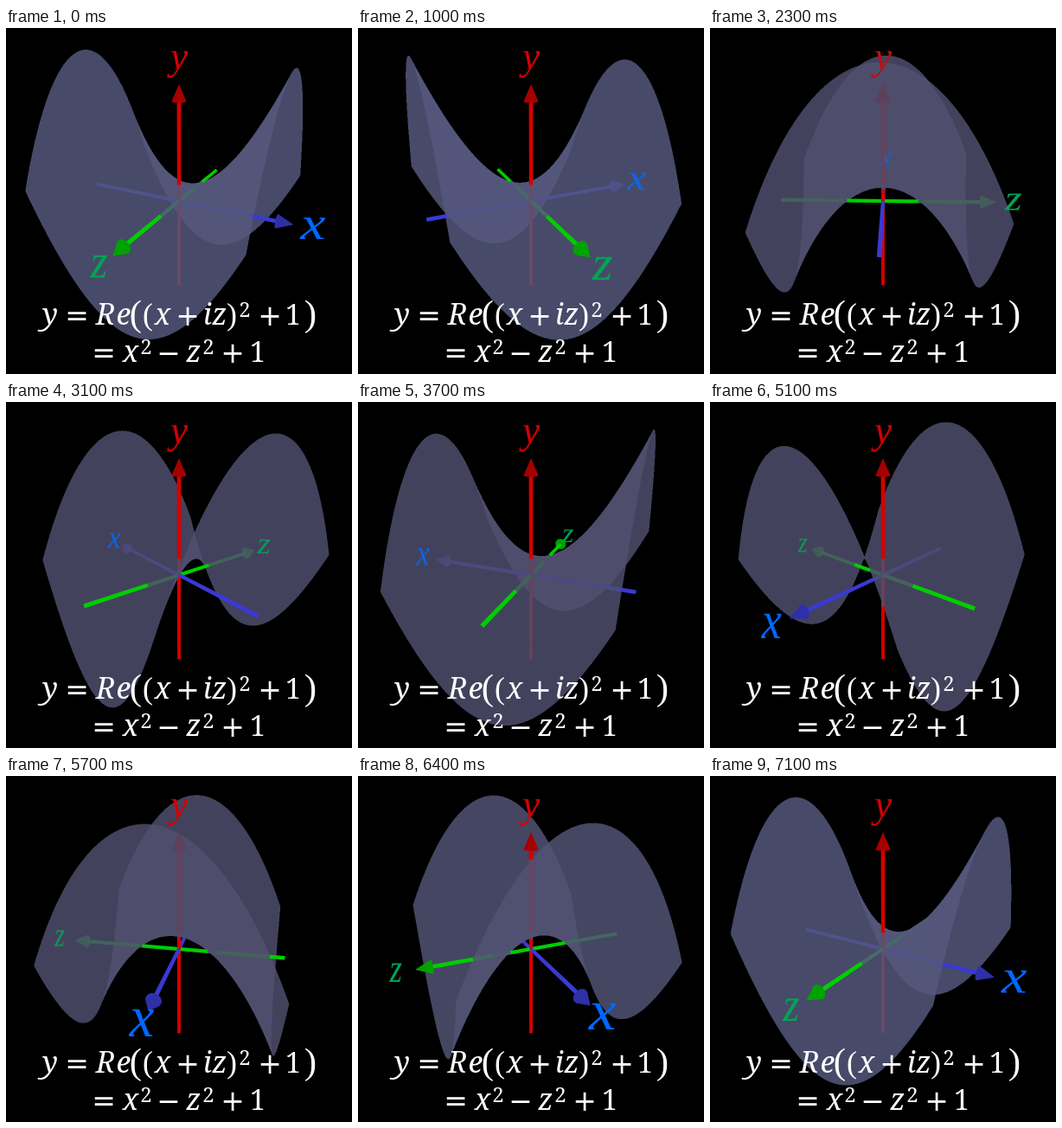
Recreate the animation shown at these times as an HTML page with a canvas. Size 400 by 400 pixels, loop 7.2 s.

```html
<!DOCTYPE html>
<html lang="en">
<head>
<meta charset="utf-8">
<title>Rotating saddle surface</title>
<style>
  html, body { margin: 0; width: 100%; height: 100%; overflow: hidden; background: #000; }
  canvas, svg { position: absolute; left: 0; top: 0; width: 400px; height: 400px; }
  text { font: italic 34px "Noto Serif", "Liberation Serif", serif; fill: #fff; text-anchor: middle; }
  .n { font-size: 32px; font-style: normal; }
  .op { font: 33px "DejaVu Sans", sans-serif; }
  .sup { font-size: 24px; font-style: normal; }
  .paren { font: 36px "Liberation Serif", serif; }
  .big { font: 43px "Liberation Serif", serif; }
</style>
</head>
<body>
<canvas id="view" width="800" height="800"></canvas>
<svg id="formula" viewBox="0 0 400 400"></svg>
<script>
const LOOP = 7200, STEP = 100, SS = 2, SIZE = 400 * SS;
const FOCAL = 442, RAD = Math.PI / 180;
const SIN = Math.sin(24.4 * RAD), COS = Math.cos(24.4 * RAD);
const TIP = 0.293, TAIL = 0.268, HEAD = 0.037, HEAD_R = 0.0165, LABEL = 0.338;
const ALPHA = 0.84;

// Saddle: y = Y0 + K (x^2 - z^2) + TX x + TZ z over a rectangle
const Y0 = 0.046, K = 4.5, TX = -0.02, TZ = 0.02;
const X_MIN = -0.263, X_MAX = 0.258, Z_MIN = -0.262, Z_MAX = 0.255;

const AXES = [
  { name: "x", dir: [1, 0, 0], line: [58, 58, 212], head: [48, 48, 168], text: [0, 104, 255], size: 47 },
  { name: "y", dir: [0, 1, 0], line: [214, 0, 0], head: [166, 0, 0], text: [214, 0, 0], size: 39 },
  { name: "z", dir: [0, 0, 1], line: [0, 206, 0], head: [0, 162, 0], text: [0, 164, 84], size: 41 }
];

const ctx = document.getElementById("view").getContext("2d");
const image = ctx.createImageData(SIZE, SIZE);
const pixels = new Uint32Array(image.data.buffer);
let ca = 1, sa = 0, eyeX, eyeZ;

const scale = (v, k) => v.map(n => n * k);
const add = (a, b) => a.map((n, i) => n + b[i]);
const css = c => `rgb(${c.map(Math.round).join()})`;

function project([x, y, z]) {
  const right = x * ca + z * sa, away = x * sa - z * ca;
  const d = 1 + away * COS - y * SIN;
  return { h: right / d, v: (y * COS + away * SIN) / d, d, right };
}
const screen = p => [200 + FOCAL * p.h, 200 - FOCAL * p.v];

function inside(t, dx, dz) {
  if (!(t > 0)) return false;
  const x = eyeX + t * dx, z = eyeZ + t * dz;
  return x >= X_MIN && x <= X_MAX && z >= Z_MIN && z <= Z_MAX;
}

// Number of surface layers met by a view ray before the given depth
function layers(h, v, depth) {
  const dy = v * COS - SIN, away = COS + v * SIN;
  const dx = h * ca + away * sa, dz = h * sa - away * ca;
  const a = K * (dx * dx - dz * dz);
  const b = 2 * K * (eyeX * dx - eyeZ * dz) + TX * dx + TZ * dz - dy;
  const c = Y0 + K * (eyeX * eyeX - eyeZ * eyeZ) + TX * eyeX + TZ * eyeZ - SIN;
  const disc = b * b - 4 * a * c;
  if (disc < 0) return 0;
  const q = -0.5 * (b + (b < 0 ? -1 : 1) * Math.sqrt(disc));
  const t1 = q / a, t2 = c / q;
  return (t1 < depth && inside(t1, dx, dz) ? 1 : 0) + (t2 < depth && inside(t2, dx, dz) ? 1 : 0);
}

function veil(color, n, surface, alpha = ALPHA) {
  for (let i = 0; i < n; i++) color = add(scale(color, 1 - alpha), scale(surface, alpha));
  return color;
}

function drawSurface(surface) {
  const shades = [0, 1, 2].map(n => {
    const [r, g, b] = veil([0, 0, 0], n, surface).map(Math.round);
    return (255 << 24 | b << 16 | g << 8 | r) >>> 0;
  });
  for (let j = 0, i = 0; j < SIZE; j++) {
    const v = (200 - (j + 0.5) / SS) / FOCAL;
    for (let k = 0; k < SIZE; k++) {
      pixels[i++] = shades[layers(((k + 0.5) / SS - 200) / FOCAL, v, 9)];
    }
  }
  ctx.putImageData(image, 0, 0);
}

function polygon(points, color) {
  ctx.beginPath();
  points.forEach(p => ctx.lineTo(...p));
  ctx.closePath();
  ctx.fillStyle = ctx.strokeStyle = color;
  ctx.lineWidth = 0.4;
  ctx.fill();
  ctx.stroke();
}

function rod(from, to, color) {
  const p = project(from), q = project(to);
  const [x1, y1] = screen(p), [x2, y2] = screen(q);
  const ex = (x2 - x1) * 0.15, ey = (y2 - y1) * 0.15;
  ctx.beginPath();
  ctx.moveTo(x1 - ex, y1 - ey);
  ctx.lineTo(x2 + ex, y2 + ey);
  ctx.lineWidth = 4.2 / p.d;
  ctx.strokeStyle = color;
  ctx.stroke();
}

function cone(dir, color) {
  const u = [dir[1], dir[2], dir[0]], w = [dir[2], dir[0], dir[1]];
  const base = scale(dir, TIP - HEAD), tip = screen(project(scale(dir, TIP)));
  const ring = Array.from({ length: 20 }, (_, i) => {
    const t = i / 20 * 2 * Math.PI;
    const side = add(scale(u, HEAD_R * Math.cos(t)), scale(w, HEAD_R * Math.sin(t)));
    return screen(project(add(base, side)));
  });
  polygon(ring, color);
  ring.forEach((p, i) => polygon([p, ring[(i + 1) % 20], tip], color));
}

function letter(axis, p, color) {
  const [x, y] = screen(p);
  ctx.save();
  ctx.translate(x, y);
  ctx.scale((1 + 0.22 * p.right / LABEL) / p.d, 1 / p.d);
  ctx.font = `italic ${axis.size}px "Liberation Serif", serif`;
  ctx.textAlign = "center";
  ctx.fillStyle = color;
  ctx.fillText(axis.name, 0, axis.size * (axis.name === "y" ? 0.13 : 0.215));
  ctx.restore();
}

function drawAxes(surface) {
  const parts = [], pieces = 90, span = TIP - HEAD + TAIL;
  const put = (at, color, paint, alpha) => {
    const p = project(at), n = layers(p.h, p.v, p.d - 0.002);
    parts.push({ d: p.d, paint: () => paint(css(veil(color, n, surface, alpha)), p) });
  };
  for (const axis of AXES) {
    const at = s => scale(axis.dir, s);
    for (let i = 0; i < pieces; i++) {
      const s = -TAIL + span * i / pieces, e = s + span / pieces;
      put(at((s + e) / 2), axis.line, color => rod(at(s), at(e), color));
    }
    put(at(TIP - HEAD / 2), axis.head, color => cone(axis.dir, color));
    put(at(LABEL), axis.text, (color, p) => letter(axis, p, color), 0.18);
  }
  parts.sort((a, b) => b.d - a.d).forEach(part => part.paint());
}

function render(step) {
  const angle = (-26.6 + 360 * step * STEP / LOOP) * RAD;
  ca = Math.cos(angle);
  sa = Math.sin(angle);
  eyeX = -COS * sa;
  eyeZ = COS * ca;
  const lit = Math.max(0, ca);
  const surface = [67 + 5 * lit, 66 + 9 * lit, 92 + 14 * lit].map(n => n / ALPHA);
  drawSurface(surface);
  ctx.setTransform(SS, 0, 0, SS, 0, 0);
  drawAxes(surface);
}

function write(y, tokens) {
  for (const [text, x, cls = "", dy = 0] of tokens) {
    const node = document.createElementNS("http://www.w3.org/2000/svg", "text");
    node.setAttribute("x", x);
    node.setAttribute("y", y + dy);
    node.setAttribute("class", cls);
    node.textContent = text;
    document.getElementById("formula").append(node);
  }
}

write(343, [
  ["y", 51], ["=", 82, "op", 1], ["R", 115], ["e", 136], ["(", 150, "big", 1], ["(", 164, "paren"],
  ["x", 181], ["+", 210, "op", 1], ["i", 233], ["z", 247], [")", 261, "paren"], ["2", 276, "sup", -9],
  ["+", 305, "op", 1], ["1", 332, "n"], [")", 352, "big", 1]
]);
write(386, [
  ["=", 113, "op", 1], ["x", 144], ["2", 162, "sup", -9], ["−", 188, "op", 1], ["z", 217],
  ["2", 234, "sup", -9], ["+", 262, "op", 1], ["1", 291, "n"]
]);

let shown = -1;
function tick() {
  const step = Math.floor(performance.now() % LOOP / STEP);
  if (step !== shown) render(shown = step);
  requestAnimationFrame(tick);
}
tick();
</script>
</body>
</html>
```
